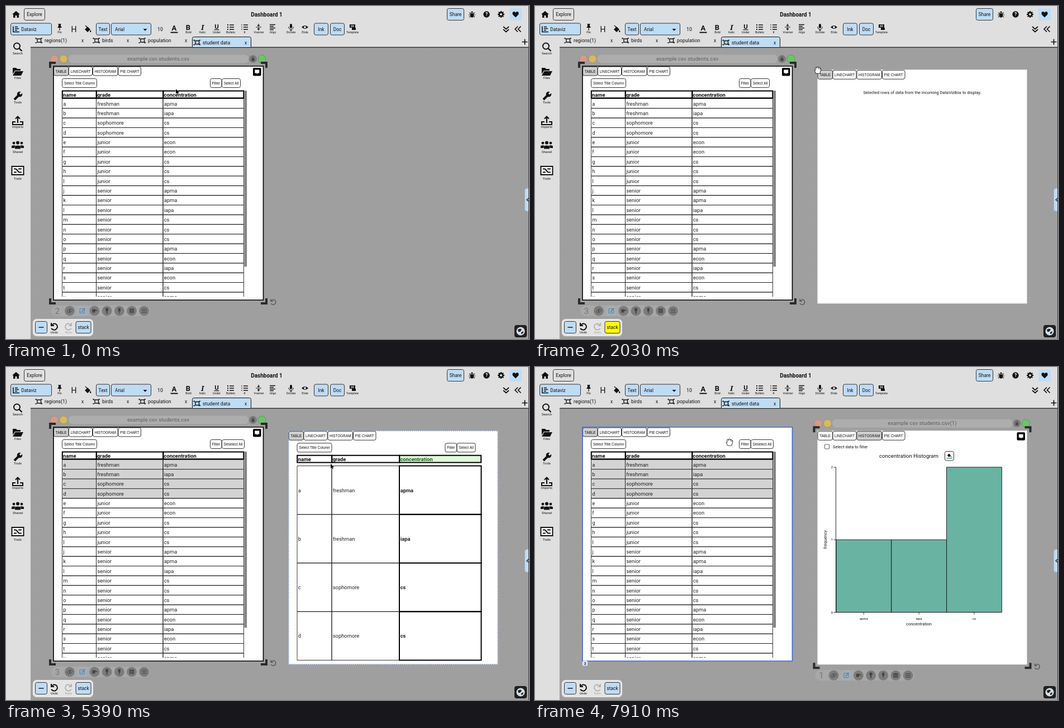
These frames come from a looping animation (936x598 px, 8 s). An HTML page with a canvas:

```html
<!DOCTYPE html>
<html lang="en">
<head>
<meta charset="utf-8">
<title>Dashboard</title>
<style>
  html, body { margin: 0; width: 100%; height: 100%; overflow: hidden; background: #9f9f9f; }
  canvas { display: block; }
</style>
</head>
<body>
<canvas id="stage" width="936" height="598"></canvas>
<script>
const g = document.getElementById('stage').getContext('2d');
const UI = 'Roboto, sans-serif', ARIAL = '"Liberation Sans", sans-serif';
const INK = '#111', BLUE = '#bfdcf5', BAR = '#dfdfdf', STEP = 70, LOOP = 8000;

const CONC = 'apma iapa cs cs econ econ cs cs cs apma apma iapa cs cs cs apma econ iapa econ cs apma'.split(' ');
const ROWS = CONC.map((c, i) => [
  'abcdefghIjklmnopqrstu'[i],
  i < 2 ? 'freshman' : i < 4 ? 'sophomore' : i < 9 ? 'junior' : 'senior', c]);

// Cursor stops: time, x, y
const PATH = [
  [70, 304, 149], [280, 299, 157], [700, 296, 157], [1470, 513, 121], [1540, 506, 115],
  [2170, 506, 115], [2870, 345, 173], [3430, 345, 173], [3640, 341, 189], [4060, 341, 189],
  [4200, 335.5, 206], [4620, 335.5, 206], [4760, 336, 225], [5110, 336, 225], [5600, 740, 140],
  [6020, 740, 140], [6160, 690, 140], [6230, 690, 140], [6370, 597.5, 133], [6440, 597.5, 133],
  [6580, 598, 125], [7070, 598, 125], [7770, 348, 135]];
const PRESSES = [[630, 1610], [3290, 3500], [3710, 3920], [4550, 4690], [4900, 5040], [5670, 5810], [6580, 6790]];
const PICKS = [3360, 3780, 4620, 4970];
const DRAG = 770, DROP = 1610, CREATE = 1890, SWITCH = 5740, CHART = 6650;

function txt(s, x, y, size, color = INK, align = 'left', weight = '', font = UI) {
  g.font = `${weight} ${size}px ${font}`;
  g.fillStyle = color;
  g.textAlign = align;
  g.fillText(s, x, y + size * .36);
}
function box(x, y, w, h, fill, stroke, r = 0, lw = 1) {
  g.beginPath();
  g.roundRect(x, y, w, h, r);
  if (fill) { g.fillStyle = fill; g.fill(); }
  if (stroke) { g.strokeStyle = stroke; g.lineWidth = lw; g.stroke(); }
}
function disc(x, y, r, fill, stroke, lw = 1) {
  g.beginPath();
  g.arc(x, y, r, 0, 7);
  if (fill) { g.fillStyle = fill; g.fill(); }
  if (stroke) { g.strokeStyle = stroke; g.lineWidth = lw; g.stroke(); }
}
function shape(d, x, y, fill, stroke, lw = 1, k = 1) {
  const p = new Path2D(d);
  g.save();
  g.translate(x, y);
  g.scale(k, k);
  if (stroke) { g.strokeStyle = stroke; g.lineWidth = lw; g.stroke(p); }
  if (fill) { g.fillStyle = fill; g.fill(p); }
  g.restore();
}
const stroke = (d, x, y, lw = 1.4, color = INK) => shape(d, x, y, null, color, lw);
const fill = (d, x, y, color = INK) => shape(d, x, y, color);

function button(s, x, y, w, bg = BLUE, cx = x + w / 2) {
  box(x + .5, y + .5, w - 1, 21, bg, '#333', 3);
  txt(s, cx, y + 11, 8.4, INK, 'center');
}

function backdrop() {
  g.fillStyle = '#9f9f9f';
  g.fillRect(0, 0, 936, 598);
  g.fillStyle = '#8b8b8b';
  for (let x = 50; x < 936; x += 32.3)
    for (let y = 83; y < 598; y += 32.3) g.fillRect(x, y, 1, 1);
}

const UNDO = 'M-5 -6 V-1 H0 M-5 -1 Q0 -7 4.5 -3 Q8 2 3 6 Q-1 8 -5 4';
const LINES = 'M-5 -4H5M-5 -1H2M-5 2H5M-5 5H2';

function topBars() {
  g.fillStyle = BAR;
  g.fillRect(0, 0, 936, 75);
  fill('M-7 0 L0 -6 L7 0 H5 V6 H1.5 V2 H-1.5 V6 H-5 V0Z', 18, 15);
  button('Explore', 32, 4, 38, BAR);
  txt('Dashboard 1', 466.5, 15, 10, INK, 'center', 'bold');
  button('Share', 789, 4, 31);
  stroke('M-5 -3L-2 -1M5 -3L2 -1M-6 1H6M-5 5L-2 3M5 5L2 3', 834, 15, 1.2);
  fill('M-3 -2H3V3Q2 6 0 6Q-2 6 -3 3ZM-2.5 -3Q0 -8 2.5 -3Z', 834, 15);
  disc(860, 15, 5.7, INK);
  txt('?', 860, 15, 8.5, '#fff', 'center', 'bold');
  for (let i = 0; i < 4; i++) {
    const c = Math.cos(i * Math.PI / 4) * 6, s = Math.sin(i * Math.PI / 4) * 6;
    stroke(`M${-c} ${-s}L${c} ${s}`, 886, 15, 2.4);
  }
  disc(886, 15, 3.2, BAR, INK, 2.4);
  box(901, 4, 22, 22, BLUE, null, 3);
  fill('M0 5.5 L-5 .5 Q-7 -4 -3 -5 Q-1 -5 0 -3 Q1 -5 3 -5 Q7 -4 5 .5Z', 912, 15);

  button('Dataviz', 8, 30.5, 74, BLUE, 41);
  stroke('M-5 -5V5H6M-2 -4H3M-2 -1H5M-2 2H2', 18, 41.5, 1.6);
  fill('M-3 -6H3L2 -5V-2L4 1H-4L-2 -2V-5ZM-.6 1H.6V6H-.6Z', 96, 38);
  txt('H', 121.5, 41.5, 14, INK, 'center');
  fill('M-5 1 L0 -4 L5 1 L0 6ZM5 2 Q8 6 5 6 Q3 5 5 2Z', 146, 41);
  stroke('M-4 -6L1 -1', 146, 41, 1.3);
  button('Text', 161, 30.5, 25);
  button('Arial', 188, 30.5, 72, BLUE, 203.5);
  fill('M-3.5 -1.5H3.5L0 2.2Z', 249, 42.5);
  txt('10', 276, 41.5, 8.8, INK, 'center');
  txt('A', 301, 39.5, 13, INK, 'center', 'bold');
  g.fillRect(294.5, 46.5, 13, 2);
  txt('B', 326, 38, 13, INK, 'center', 'bold');
  txt('I', 351.5, 38, 13, INK, 'center', 'italic bold', '"Noto Serif", serif');
  txt('U', 377, 37, 11.5, INK, 'center', 'bold');
  g.fillRect(372.5, 42, 9, 1.2);
  for (const x of [402, 427]) {
    stroke('M-2 -4H6M-2 0H6M-2 4H6', x, 38, 1.5);
    stroke('M-6 -4H-4M-6 0H-4M-6 4H-4', x, 38, x < 420 ? 2 : 1.2);
  }
  stroke('M0 -6V-2M-2 -3.5L0 -2L2 -3.5M-5 0H5M0 6V2M-2 3.5L0 2L2 3.5', 452, 38, 1.2);
  stroke(LINES, 477, 37.5, 1.4);
  mic(510, 38, INK);
  fill('M-6 0Q0 -6 6 0Q0 6 -6 0Z', 535, 38);
  disc(535, 38, 2, BAR);
  button('Ink', 551, 30.5, 26);
  button('Doc', 580, 30.5, 26);
  fill('M-5 -5H5V1H-5ZM-1 1H6V5H-1Z', 620, 38);
  stroke('M-3 -3H3M-3 -1H3', 620, 38, 1, BAR);
  [['Pin', 96], ['Bold', 326.5], ['Italic', 351.5], ['Under', 377], ['Bullets', 402], ['#', 427], ['Vcenter', 452.5],
   ['Align', 477.5], ['Dictate', 510], ['Elide', 535], ['Template', 620]]
    .forEach(([s, x]) => txt(s, x, 47.5, 5.3, INK, 'center'));
  stroke('M-5 -4.5L0 0L5 -4.5M-5 .5L0 5L5 .5', 895, 41.5, 1.7);
  stroke('M0 -5L-5 0L0 5M5.5 -5L.5 0L5.5 5', 916, 41.5, 1.7);
}

function mic(x, y, color) {
  fill('M-2 -4Q-2 -6 0 -6Q2 -6 2 -4V0Q2 2 0 2Q-2 2 -2 0Z', x, y, color);
  stroke('M-4 -1Q-4 4 0 4Q4 4 4 -1M0 4V6M-2 6H2', x, y, 1, color);
}

function tabs() {
  [['regions(1)', 54, 137], ['birds', 157, 218], ['population', 239, 322], ['student data', 337, 429]].forEach(([s, x, close], i) => {
    const y = i === 3 ? 65.5 : 62;
    if (i === 3) box(333.5, 55.5, 105, 19, BLUE, INK, [3, 3, 0, 0]);
    box(x + 2, y - 3, 6.5, 6, null, INK, 0, 1.4);
    stroke('M0 -5V-2M-2 -4H1M10 5V2M8 4H11M10 -5V-3M8 -4H11M0 5V3M-2 4H1', x, y, 1);
    txt(s, x + 15, y, 8.8);
    txt('x', close, y, 8.5, INK, 'center');
  });
  g.fillStyle = '#333';
  g.fillRect(44, 73.5, 289, 1.5);
  g.fillRect(439, 73.5, 497, 1.5);
  stroke('M-5 0H5M0 -5V5', 928.5, 64.5, 1.7);
}

function sidebar() {
  g.fillStyle = BAR;
  g.fillRect(0, 53, 44, 545);
  disc(19.5, 72, 5.5, null, INK, 2);
  stroke('M3 3L8 8', 20.5, 73, 2.4);
  fill('M-9 -7H-3L-1 -5H5V-2H-5L-9 4ZM-4.5 -1H10L6 7H-9Z', 21, 118);
  stroke('M-6 6L2 -2', 21, 162, 4);
  disc(24.5, 158.5, 4.8, INK);
  stroke('M0 0L5 -5', 25, 158, 3.2, BAR);
  stroke('M0 4V-7M-4 -3.5L0 -7.5L4 -3.5', 21, 206, 2.2);
  stroke('M-4 2H-9V7H9V2H4', 21, 206, 2);
  for (const [dx, k] of [[-7, .8], [7, .8], [0, 1]]) {
    disc(21 + dx, 248.5 - 3 * k, 3 * k, INK);
    shape('M-5 7V4Q-5 1 0 1Q5 1 5 4V7Z', 21 + dx, 249.5, INK, BAR, 1, k);
  }
  box(10.5, 288, 21, 15, '#fff', INK, 0, 2);
  stroke('M-7 -3H-3M1 -3H7M-7 3H-2M2 3H7M-3 -3L2 3', 21, 295.5, 2);
  [['Search', 84.5], ['Files', 129], ['Tools', 173], ['Imports', 217], ['Shared', 261.5], ['Trails', 310]]
    .forEach(([s, y]) => txt(s, 21, y, 5.8, INK, 'center'));
}

function corners(yellow) {
  box(48.5, 562.5, 107, 30, '#e4e4e4', '#eee', 6);
  button('', 52, 566, 22);
  stroke('M-4.5 0H4.5', 63, 577, 1.4);
  stroke(UNDO, 86, 575, 2);
  g.save();
  g.translate(112, 575);
  g.scale(-1, 1);
  stroke(UNDO, 0, 0, 1.6, '#aaa');
  g.restore();
  txt('Undo', 86.5, 586, 5.6, INK, 'center');
  txt('Redo', 112, 586, 5.6, '#aaa', 'center');
  button('stack', 124.5, 566, 28, yellow ? '#ff0' : BLUE);
  box(910.5, 573.5, 21, 21, '#222', '#111', 3);
  disc(921, 584, 7, '#cfdfea', '#eee', 1);
  fill('M-5 -3Q0 -6 2 -3L-1 1L-4 1ZM1 2L5 0L4 4L1 5Z', 921, 584, '#222');
  box(928.5, 327.5, 14, 41, BLUE, '#9cb8cf', 4);
  stroke('M2 -3.5L-2 0L2 3.5', 934, 348, 1.2);
  g.fillStyle = '#444';
  g.fillRect(935, 0, 1, 598);
}

// Selection handles, title bar and link buttons around a panel
function handles(x, y, title, count) {
  disc(x + 1.5, y - 13, 7, '#d59b8b', '#a98377', .7);
  disc(x + 18, y - 13, 7, '#d6b962', '#a08e57', .7);
  box(x + 27, y - 20.5, 322, 15, '#adadad', null, 7);
  txt(title, x + 187.5, y - 13.5, 9.7, '#5f5f5f', 'center');
  disc(x + 357, y - 13, 7, '#7d7d7d');
  box(x + 354.5, y - 14, 5, 4.5, '#444');
  stroke('M-1.6 0V-2Q0 -4.5 1.6 -2V0', x + 357, y - 14, 1, '#444');
  disc(x + 373, y - 13, 7, '#6cc46a', '#4d974d', .8);
  stroke('M-6 9V0H4', x, y - 6, 4, '#2b2b2b');
  stroke('M-4 0H6V9', x + 375, y - 6, 4, '#2b2b2b');
  stroke('M-6 -9V0H4', x, y + 426, 4, '#2b2b2b');
  stroke('M-4 0H6V-9', x + 375, y + 426, 4, '#2b2b2b');
  shape(UNDO, x + 393, y + 423, null, '#555', 1.7, .8);

  const by = y + 439.5;
  box(x - 4, by - 9.5, 177, 19, '#a8a8a8', null, 9);
  txt(count, x + 7, by, 15, '#68798a', 'center');
  for (let i = 0; i < 7; i++) {
    const bx = x + 29 + i * 22.2;
    if (i === 1) {
      box(bx - 9, by - 9, 18, 18, '#a3adb6', null, 3);
      box(bx - 4, by - 4, 8, 8, null, '#5c83a8', 1, 1.2);
      stroke('M-1 2L5 -5', bx, by, 1.6, '#5c83a8');
      continue;
    }
    disc(bx, by, 9, '#7c7c7c');
    if (i === 0) {
      stroke('M-5 1L-1 -3L1 0L-2 4ZM5 -1L1 3L-1 0L2 -4Z', bx, by, 1, '#444');
    } else if (i === 2) fill('M-4 -3H0L5 -1V0H1V3H-4Z', bx, by, '#444');
    else if (i === 3) fill('M-2.5 -5H2.5V-1L1 1V5H-1V1L-2.5 -1Z', bx, by, '#444');
    else if (i === 4) shape('M-2 -5H2V1H-2ZM-.6 1H.6V5H-.6Z', bx, by, '#444');
    else if (i === 5) { box(bx - 4, by - 4, 8, 8, '#444'); stroke('M-3 -1H3M-3 2H3', bx, by, 1, '#7c7c7c'); }
    else stroke('M-4.5 -3H4.5M-4.5 0H4.5M-4.5 3H4.5', bx, by, 1.2, '#444');
  }
}

function small(s, x, y, w, bg = '#fff') {
  box(x + .5, y + .5, w - 1, 16, bg, '#333', 3);
  txt(s, x + w / 2, y + 8.7, 6.4, INK, 'center', '', ARIAL);
}

function panel(x, y, active, border, chat) {
  g.fillStyle = '#fff';
  g.fillRect(x, y, 375, 420);
  [['TABLE', 0, 27.5], ['LINECHART', 27, 43], ['HISTOGRAM', 70, 45.5], ['PIE CHART', 115.5, 41.5]]
    .forEach(([s, dx, w], i) => small(s, x + dx, y + .5, w, i === active ? '#cfcfcf' : '#fff'));
  if (chat) {
    box(x + 357, y + 3, 14.5, 14.5, '#000', null, 2);
    fill('M-4 -3.5H4V2.5H1.5L-.5 4.5V2.5H-4Z', x + 364.3, y + 10, '#fff');
  }
  g.setLineDash(border === 'dotted' ? [2, 1.5] : []);
  if (border === 'black') box(x, y, 375.5, 420, null, '#000', 0, 1.6);
  if (border === 'dotted') box(x + .5, y + .5, 374, 419, null, '#5f80b5', 0, 1);
  if (border === 'blue') box(x, y, 375.5, 420, null, '#3f68cc', 0, 1.6);
  g.setLineDash([]);
}

function tableButtons(x, y, all) {
  small('Select Title Column', x + 15, y + 22, 63);
  small('Filter', x + 280, y + 22, 21.5);
  small(all, x + 301, y + 22, all.length > 10 ? 41 : 34);
}

function tableHead(x, y, w, cols, marked) {
  if (marked) { g.fillStyle = '#e2f8d8'; g.fillRect(x + cols[2], y, w - cols[2], 13); }
  ['name', 'grade', 'concentration'].forEach((s, i) => {
    const end = i < 2 ? cols[i + 1] : w;
    box(x + cols[i], y, end - cols[i], 12.7, null, '#000', 0, 2);
    txt(s, x + cols[i] + 1.2, y + 6.7, 9.4, marked && i === 2 ? '#1f5a1f' : INK, 'left', 'bold');
  });
}

function tableRows(x, y, w, cols, rows, rh, chosen, marked) {
  rows.forEach((row, r) => {
    const ry = y + r * rh;
    if (r < chosen) { g.fillStyle = '#d3d3d3'; g.fillRect(x, ry, w, rh); }
    row.forEach((s, i) => {
      const bold = marked && i === 2, end = i < 2 ? cols[i + 1] : w;
      box(x + cols[i], ry, end - cols[i], rh, null, bold ? '#000' : '#222', 0, bold ? 2 : .9);
      txt(s, x + cols[i] + 1.7, ry + rh / 2 + .2, 9.4, '#222', 'left', bold ? 'bold' : '');
    });
  });
}

function leftPanel(border, chat, picked) {
  const x = 85, y = 108, cols = [0, 61, 180.5];
  panel(x, y, 0, border, chat);
  tableButtons(x, y, picked ? 'Deselect All' : 'Select All');
  g.save();
  g.beginPath();
  g.rect(x, y, 375, 414);
  g.clip();
  tableRows(100.5, 166.3, 325, cols, ROWS, 17.38, picked);
  g.restore();
  tableHead(100.8, 152.5, 324.5, cols);
  g.fillStyle = '#828282';
  g.fillRect(426.5, 152, 4.5, 316);
}

function histogram() {
  box(518.5, 139, 8, 8, '#fff', '#555', 1);
  txt('Select data to filter', 533, 143, 7.5);
  txt('concentration Histogram', 669, 160, 9.6, INK, 'center');
  box(733.5, 151.5, 16, 16.5, '#fff', '#333', 3);
  shape('M-5 1L0 -4L5 1L0 6ZM5 2Q8 6 5 6Q3 5 5 2Z', 741, 158, INK, null, 1, .65);
  g.fillStyle = '#69b3a2';
  g.fillRect(736.5, 163, 10, 2);
  [1, 1, 2].forEach((n, i) => {
    const bx = 539 + i * 98.8;
    box(bx, 440.5 - 130.3 * n, 98.8, 130.3 * n, '#69b3a2', '#111', 0, .9);
    stroke('M0 0V4', bx + 49.4, 440.5, .8);
    txt(CONC[i], bx + 49.4, 452, 5.9, INK, 'center');
  });
  stroke('M-4 0H0V260.5H-4M-4 130.3H0M0 260.5H296.4', 538.5, 180, .9);
  for (let n = 0; n < 3; n++) txt(n, 533, 440.5 - 130.3 * n, 5.9, INK, 'right');
  txt('concentration', 687, 461, 7.5, INK, 'center');
  g.save();
  g.translate(519, 310);
  g.rotate(-Math.PI / 2);
  txt('frequency', 0, 0, 7.6, INK, 'center');
  g.restore();
}

function rightPanel(border, chat, picked, chart) {
  const x = 505.5, y = 114.3;
  panel(x, y, chart ? 2 : 0, border, chat);
  if (chart) return histogram();
  if (!picked) return txt('Selected rows of data from the incoming DataVizBox to display.', 693, 155, 7.5, INK, 'center');
  const cols = picked < 3 ? [0, 65.5, 174.5] : [0, 62, 183];
  const top = picked < 3 ? 182.5 : 177.5, h = picked < 3 ? 342.5 : 349;
  tableButtons(x, y, 'Select All');
  tableHead(521.2, 158.7, 329, cols, true);
  tableRows(521, top, 329.5, cols, ROWS.slice(0, picked), h / picked, 0, true);
}

function cursorAt(t) {
  const i = PATH.findIndex(p => p[0] > t);
  if (i === 0) return PATH[0].slice(1);
  if (i < 0) return PATH.at(-1).slice(1);
  const [t0, x0, y0] = PATH[i - 1], [t1, x1, y1] = PATH[i];
  const u = (t - t0) / (t1 - t0), k = u * u * (3 - 2 * u);
  return [x0 + (x1 - x0) * k, y0 + (y1 - y0) * k];
}

function cursor(t, x, y) {
  const inTable = x > 100 && x < 426 && y > 152;
  const inLeft = x > 85 && x < 460;
  if ((t >= 140 && t < CREATE) || inTable) {
    shape('M-1.3 1Q0 -1 1.3 1V5Q3 4 3.6 5.3Q5 4.7 5.6 6Q7.2 5.5 7.3 7V9Q7 11 5.9 12H0Q-2 9.5 -3 7.4Q-2.5 5.8 -1.3 7.2Z', x, y, '#fff', '#000', 1.6, .95);
    stroke('M2 8V10.5M4 8V10.5', x, y, .7);
  } else if ((t >= CREATE && t < 5250) || (t > 7140 && inLeft)) {
    shape('M-3 6L-5.5 1Q-5 -.6 -3.6 .8L-4.2 -4Q-3 -5.4 -2.2 -4L-1.8 -1L-1.2 -5Q0 -6.4 1 -5L1.2 -1L2.2 -4.4Q3.4 -5.4 4 -4L3.8 0L4.8 -2.2Q6.2 -2.6 6 -1.2L4.6 3L3.8 6Z', x, y, '#fff', '#000', 1.6, .95);
  } else {
    shape('M0 0V11L2.5 8.8L4.2 12.4L6 11.6L4.4 8.2H7.8Z', x, y, '#000', '#fff', 1.2, .8);
  }
}

function draw(t) {
  const [x, y] = cursorAt(t);
  const picked = PICKS.filter(p => t >= p).length;
  const switched = t >= SWITCH;
  const hover = t > 7140 && x < 460;
  backdrop();
  topBars();
  sidebar();
  tabs();
  if (t < DRAG || (t >= CREATE && !switched)) handles(85, 108, 'example csv students.csv', t < CREATE ? 2 : 3);
  if (switched) handles(505.5, 114.3, 'example csv students.csv(1)', 1);
  leftPanel(!switched ? 'black' : hover ? 'blue' : 'dotted', !switched, picked);
  if (hover) {
    box(85, 527.5, 9, 9, '#e6ecf5', null, 2);
    txt('3', 89.5, 532, 8, '#1d3a66', 'center', 'bold');
  }
  if (t >= CREATE)
    rightPanel(switched ? (hover ? '' : 'black') : t < 2240 ? '' : 'dotted', switched, picked, t >= CHART);
  corners(t >= DRAG && t < 2240);
  if (t >= DRAG && t < DROP) {
    box(x - 14.5, y - 1.5, 143, 11.5, 'rgba(110,110,110,.4)', '#3a3a3a', 0, 2);
    txt('concentration', x - 13.8, y + 4.8, 7.6, '#3a3a3a', 'left', 'bold');
  }
  cursor(t, x, y);
  if (PRESSES.some(([a, b]) => t >= a && t < b)) disc(x, y, 22.5, null, '#111', 1.3);
}

function tick(now) {
  const t = now % LOOP;
  draw(Math.min(LOOP - 90, Math.floor(t / STEP) * STEP));
  requestAnimationFrame(tick);
}
requestAnimationFrame(tick);
</script>
</body>
</html>
```
